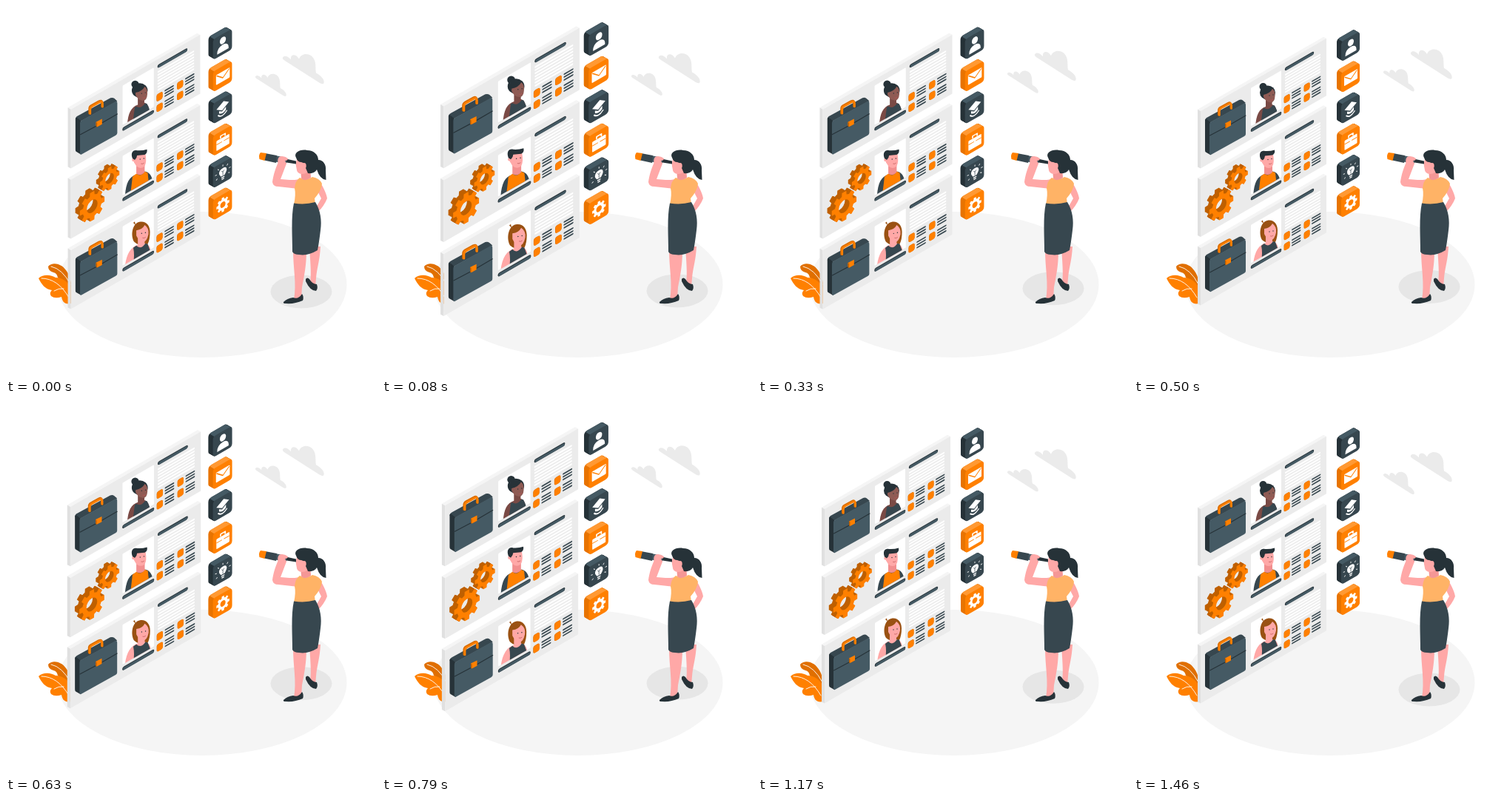
An HTML page for the animation above (1.54 s loop, 500 by 500 pixels).

```html
<!DOCTYPE html>
<html lang="en">
<head>
<meta charset="utf-8">
<title>Searching for candidates</title>
<style>
html, body { margin: 0; width: 100%; height: 100%; overflow: hidden; background: #fff; }
svg { display: block; width: 100%; height: 100%; }
</style>
</head>
<body>
<svg id="stage" viewBox="0 0 500 500"></svg>
<script>
const ORANGE = '#ff8000', SLATE = '#455a64', DARK = '#37474f', INK = '#263238', SKIN = '#ffa8a7';
const LOOP = 1540, LEAD = 42;

const path = (d, fill, extra = '') => `<path d="${d}" fill="${fill}" ${extra}/>`;
const line = (d, stroke, width) =>
  `<path d="${d}" fill="none" stroke="${stroke}" stroke-width="${width}" stroke-linecap="round" stroke-linejoin="round"/>`;
const dot = (x, y, r, fill) => `<circle cx="${x}" cy="${y}" r="${r}" fill="${fill}"/>`;
const oval = (x, y, rx, ry, fill) => `<ellipse cx="${x}" cy="${y}" rx="${rx}" ry="${ry}" fill="${fill}"/>`;
const rect = (x, y, w, h, rx, fill) => `<rect x="${x}" y="${y}" width="${w}" height="${h}" rx="${rx}" fill="${fill}"/>`;
const move = (x, y, body) => `<g transform="translate(${x} ${y})">${body}</g>`;
const iso = (x, y, body) => `<g transform="translate(${x} ${y}) skewY(-30)">${body}</g>`;
const times = (n, fn) => Array.from({ length: n }, (_, i) => fn(i)).join('');

// Stacks copies of a wall-coloured shape towards the back left
const extrude = (x, y, depth, wall) =>
  times(depth * 2, i => { const k = depth - i / 2; return iso(x - k, y - k * 0.577, wall); });

function gearPath(r, teeth, hole) {
  const points = [];
  for (let i = 0; i < teeth; i++)
    for (const [turn, k] of [[-.32, .76], [-.22, 1], [.22, 1], [.32, .76]]) {
      const a = (i + turn) / teeth * 2 * Math.PI;
      points.push((r * k * Math.cos(a)).toFixed(2) + ' ' + (r * k * Math.sin(a)).toFixed(2));
    }
  const h = r * hole;
  return `M${points.join('L')}ZM${-h} 0a${h} ${h} 0 1 0 ${2 * h} 0a${h} ${h} 0 1 0 ${-2 * h} 0Z`;
}

function gear(x, y, r, depth) {
  const face = fill => path(gearPath(r, 8, .43), fill, 'fill-rule="evenodd" transform="scale(.866 1)"');
  return extrude(x, y, depth, face('#bf6000')) + iso(x, y, face(ORANGE));
}

function briefcase() {
  return path('M96 155Q96 152 99 150.500L142 127Q145 126 147 127.500L151 131L102 158Z', DARK) +
    path('M96 155Q96 152 98 153L103 157V201L97 197.500Q96 197 96 195Z', INK) +
    path('M102 160Q102 157.500 104 156.500L148 132Q151 130.500 151 133.500V173Q151 175 149 176L104 201Q102 202 102 199Z', SLATE) +
    line('M102.500 175L127 162L151 148', INK, 1.1) +
    line('M114.500 147V141Q114.500 138.500 117 137L127 131.500Q131 129.500 131 133.500V138', '#d96d00', 3) +
    line('M115.500 147.500V142Q115.500 139.500 118 138L128 132.500Q131.700 130.500 131.700 134.500V138.500', ORANGE, 2.5) +
    path('M123 158.500L131 154.500V161.500L124.500 165L123 164Z', ORANGE) +
    path('M123 158.500L124.500 159.500V165L123 164Z', '#bf6000');
}

const features = (x, y) => dot(x, y, .7, INK) + dot(x + 5, y - 1, .7, INK) +
  line(`M${x + 1.5} ${y + 6}q2 .800 3.500 -.8`, '#b55', .7);

const portraits = [
  dot(174.5, 109, 5, INK) + oval(180.5, 117, 10.5, 9.5, INK) +
    path('M164 164C165 147 169 139 178 136V123H187L186.500 133Q193 135 193 145L195 152Z', '#7a4a45') +
    path('M175 120Q184 118 187 112Q191 114 190.500 122Q190 130 185 130.500Q178 130 175 123Z', '#8f5b54') +
    path('M171 162L174 139L176 138Q182 142 187.500 134L190 134.500L193 141L195 152Z', DARK) + features(183, 121),
  path('M161 166C162 147 166 138 176 135L187 131Q196 132 198 146Z', DARK) +
    path('M168 164L171 138L176 134Q182 139 187 131L191 133L193 152Z', ORANGE) +
    path('M176 122V134Q182 138 187 132V122Z', '#f28f8f') +
    path('M174 108H188Q190 119 187 124Q182 129 176 124L173 119Z', SKIN) + dot(172.5, 116, 2.2, SKIN) +
    path('M171 114C168 106 172 102 177 103.500Q184 104 190 102Q191 107 187 109L177 110Q177 113 174 116Z', INK) + features(181, 115),
  path('M173 131C168 122 171 107 180 105C188 103 194 109 194 118Q194 128 191 134Q181 138 173 131Z', '#9a5112') +
    path('M161 164C163 146 169 138 178 135V125H187V133Q194 134 195 143L196 152Z', SKIN) +
    path('M176 116Q184 115 187 109Q193 113 192 121Q190 131 185 131Q179 130 176 123Z', SKIN) +
    path('M172 160Q174 148 172 139L176 136Q182 142 188 133L191 134L194 142V152Z', DARK) +
    path('M172 106L174 104.500L175 109Z', '#9a5112') + features(183, 120)
];

function cardText() {
  const bullets = times(4, i => {
    const x = 113 + i % 2 * 27, y = 46 + (i >> 1) * 14;
    return rect(x - .5, y - .3, 8, 9.3, 2.3, '#d96d00') + rect(x, y, 7.5, 9.3, 2.3, ORANGE) +
      times(3, k => line(`M${x + 11} ${y + .8 + k * 3.6}h10.500`, DARK, 1.8));
  });
  return rect(68, 8, 41, 51.5, 1, '#fff') + bullets +
    line('M116 9.500H151', INK, 4.4) + line('M116.500 10H151', SLATE, 3.4) +
    times(7, i => line(`M115 ${17 + i * 3.9}H161`, '#fff', 2.2)) +
    line('M70 65.500H107', INK, 4.6) + line('M70.500 66H107', SLATE, 3.6);
}

function card(i) {
  const picture = i === 1 ? gear(118, 176.8, 19, 6) + gear(141, 140.3, 15, 5) : briefcase();
  return move(0, i * 92.5,
    path('M90 142L86 139.700L256 41.700L260 44Z', '#f5f5f5') +
    path('M86 139.700L90 142V219.500L86 217.500Z', '#e0e0e0') +
    iso(90, 142, rect(0, 0, 170, 77.5, 0, '#ebebeb') + cardText()) +
    picture + `<g clip-path="url(#photo)">${portraits[i]}</g>`);
}

// Glyphs sit around the middle of a tile face
const glyphs = [
  oval(0, -5, 4, 4.5, '#fff') + path('M-7.500 9.500Q-8 1 0 .5Q8 1 7.500 9.500Z', '#fff'),
  rect(-9, -6.5, 18, 13, 1, '#fff') + line('M-8 -5L0 2L8 -5', ORANGE, 1.2),
  path('M-8.500 -3L1 -9L8 -4L-1 2Z', '#fff') + path('M-5 1L-1 3.500L4 0V4Q0 8 -5 4Z', '#fff') +
    line('M-6 6Q-1 12 5 6', '#fff', 1.6),
  rect(-8.5, -4, 17, 13, 1, '#fff') + line('M-3 -5V-7.500H3V-5', '#fff', 1.6) +
    line('M-8 1H-1.500M1.500 1H8', ORANGE, .9),
  path('M-2.500 4Q-5.500 0 -5 -2Q-4.500 -6 0 -6Q4.500 -6 5 -2Q5.500 0 2.500 4Z', '#fff') +
    line('M-1.500 6H1.500M-1 8.300H1', '#fff', 1.5) + line('M0 3V-1L-1.500 -2.500M0 -1L1.500 -2.500', DARK, .6) +
    times(7, i => `<g transform="rotate(${i * 40 - 120})">${line('M0 -8.500V-10', '#fff', .9)}</g>`),
  path(gearPath(9.5, 8, .4), '#fff', 'fill-rule="evenodd" transform="scale(.9 1)"')
];

function tile(glyph, i) {
  const [front, wall, top] = i % 2 ? [ORANGE, '#e87400', '#ff9933'] : [DARK, INK, SLATE];
  const y = 48.5 + i * 42.2;
  return extrude(280, y, 6, rect(0, 0, 25, 27, 4, wall)) +
    iso(280, y, path('M2 1L-4 -6L-2 -7H16L23 0L20 3Z', top) + rect(0, 0, 25, 27, 4, front) + move(13, 13.5, glyph));
}

const cloud = path('M0 5C2 2 7 3 11 8C10 0 18 0 22 7C25 -2 39 -2 43 9C45 14 44 21 45 26C51 29 57 35 55.500 39.500Q55 42 50 39.500L3 9.500Q-1 7 0 5Z', '#ebebeb');

const leaves =
  path('M57 352C62 346 74 347 81 357Q86 363 88 374V384C82 378 76 371 70 367Q69 361 64 360Q57 358 57 352Z', '#e06f00') +
  line('M61 352Q76 355 87 376', '#fff', .9) +
  path('M44 368C50 362 61 363 67 367C76 367 84 373 88 381V402C79 404 76 399 75 393Q66 396 61 392Q58 388 62 384C53 383 48 376 44 368Z', ORANGE) +
  line('M48 368Q70 368 85 394M65 385Q71 381 78 382', '#fff', .9);

const woman =
  path('M410 325H425C424 345 420 354 419 368L418 379L411 375C413 360 411 345 410 325Z', SKIN) +
  path('M405 369Q407 366 410 369Q414 376 420 376Q422 382 419 385Q411 385 405 372Z', INK) +
  path('M388 330H406C406 350 403 365 400 380L399 396L389 397C393 375 388 355 388 330Z', SKIN) +
  path('M375 400Q380 395 388 394Q395 397 400 389Q403 393 401 398Q390 403 378 402Q374 402 375 400Z', INK) +
  path('M422 236C427 240 433 253 434 260Q430 270 422 278L418 274L426 260L419 246Z', SKIN) +
  path('M397 234C392 235 389 235 383 235L371 234L379 213L370 207C365 216 361 229 360 238Q361 244 368 244L395 247Z', SKIN) +
  path('M397 232Q406 237 414 231Q424 233 427 240Q426 250 417 260L418 268H389Q392 255 390 246Q391 236 397 232Z', '#ffb366') +
  path('M389 266.500Q404 269 418 265C425 276 427 290 425 303Q423 320 421 330Q408 338 396 336Q389 336 387 332C387 310 385 285 389 266.500Z', DARK) +
  path('M398 219L411 216L412 232Q404 238 399 233Z', '#f59796') +
  path('M393 207Q391 214 392.500 219Q393 227 400 227Q408 227 411 220L412 206Q402 200 393 207Z', SKIN) +
  path('M392 205C388 198 398 193 407 195C416 195 422 201 422 208C429 208 433 215 432 222L432.500 235Q424 234 420 221Q417 227 408 226L405 219Q405 212 399 211Q394 211 392 205Z', INK) +
  oval(403, 216, 2.7, 4, SKIN) +
  path('M376 206L392 209.500L392 213.500L376 211Z', INK) +
  path('M364 202L379 205L379 212.500L363 210.500Z', SLATE) +
  path('M350 199L366 202L365 212L349 208.500Z', DARK) +
  path('M344 198L352 199L349.500 209L342.500 207Q341 201 344 198Z', ORANGE) +
  path('M369 204Q374 201 381 206Q381 209 377 209L379 213Q374 217 368 213Q366 208 369 204Z', SKIN);

document.getElementById('stage').innerHTML =
  '<clipPath id="photo"><path d="M158 90L199 70V139L158 162.500Z"/></clipPath>' +
  oval(265, 376.5, 195.5, 98.5, '#f5f5f5') +
  `<g id="floating">${oval(399, 386.5, 41.5, 22.5, '#e6e6e6')}${move(374, 65, cloud)}
    <g transform="translate(337 92) scale(.75)">${cloud}</g></g>` +
  leaves +
  `<g id="cards">${times(3, i => card(2 - i))}</g>` +
  `<g id="tiles">${glyphs.map(tile).reverse().join('')}</g>` +
  woman;

const [floating, cards, tiles] = ['floating', 'cards', 'tiles'].map(id => document.getElementById(id));
const BEAT = [[0, 1], [.1, 1.1], [.3, 1], [.4, 1], [.5, 1.1], [.6, 1], [1, 1]];
const FLOAT = [[0, 0], [.5, -10], [1, 0]];

function tween(keys, p) {
  const i = keys.findIndex(key => key[0] > p);
  const [a, from] = keys[i - 1], [b, to] = keys[i];
  return from + (to - from) * (p - a) / (b - a);
}

function scaleAbout(node, x, y, s) {
  node.setAttribute('transform', `translate(${x} ${y}) scale(${s}) translate(${-x} ${-y})`);
}

function draw() {
  const t = performance.now() % LOOP;
  const phase = (Math.min(t, 1460) + LEAD) % LOOP / LOOP;
  const beat = t < 1460 ? tween(BEAT, phase) : 1;
  scaleAbout(cards, 173, 223, beat);
  scaleAbout(tiles, 290, 159, beat);
  floating.setAttribute('transform', `translate(0 ${tween(FLOAT, phase)})`);
  requestAnimationFrame(draw);
}
draw();
</script>
</body>
</html>
```
